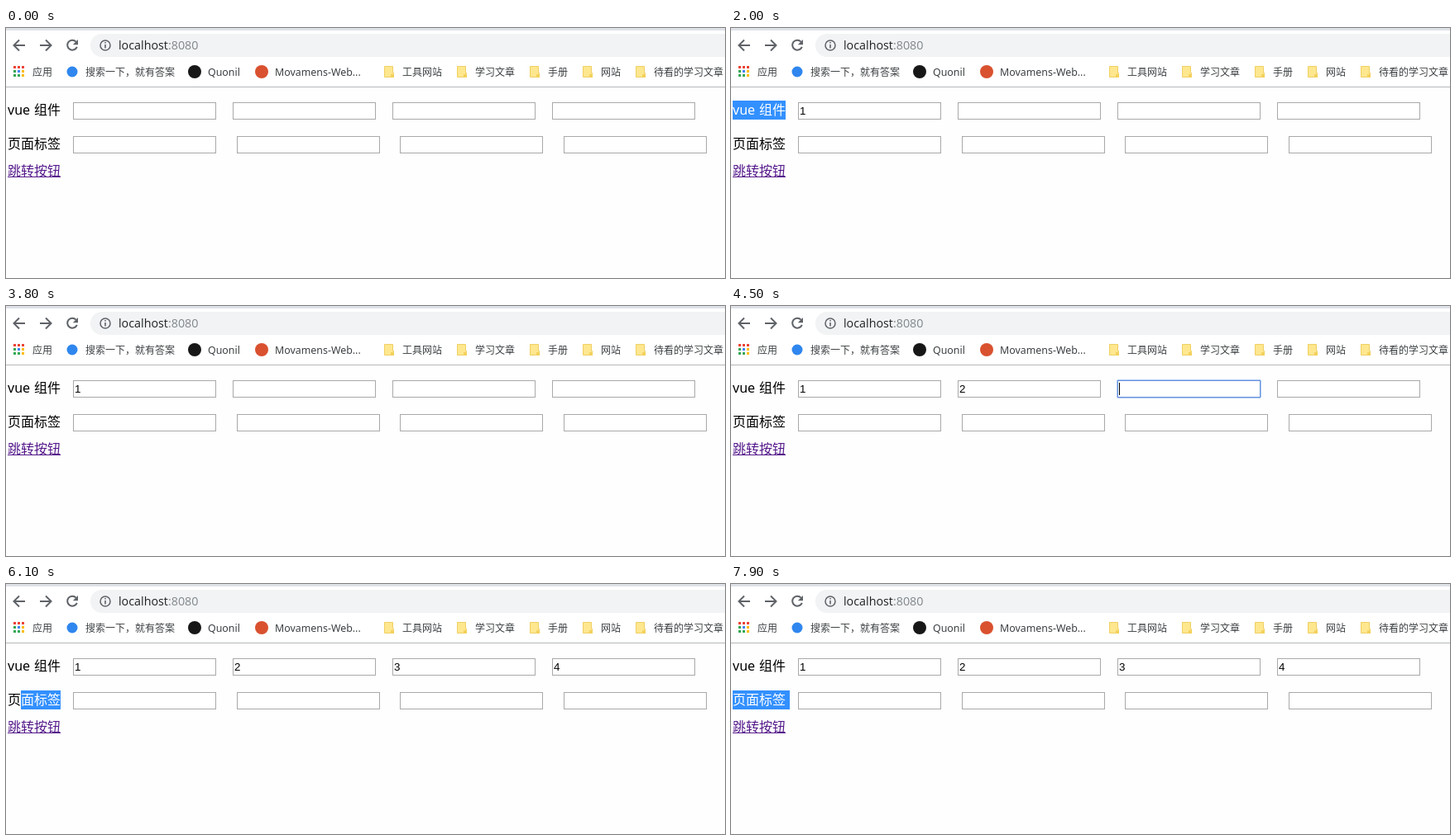
Recreate the animation shown at these times as an HTML page. Size 869x303 px, loop 8000 ms.

```html
<!DOCTYPE html>
<html lang="zh-CN">
<head>
<meta charset="utf-8">
<title>localhost:8080</title>
<style>
  html, body { margin: 0; width: 100%; height: 100%; overflow: hidden; background: #fefefe; }
  svg { display: block; }
  text { font-family: "Noto Sans", "Noto Sans CJK SC", "Noto Sans CJK", sans-serif; white-space: pre; }
  .bookmark { font-size: 12px; fill: #3c4043; }
  .latin { font-size: 12.4px; }
  .label { font-size: 16px; }
  .value { font: 13.333px "Liberation Sans", Arial, sans-serif; }
  .address { font: 14.3px "Open Sans", sans-serif; fill: #202124; }
  .icon { fill: none; stroke: #5f6368; stroke-width: 2; }
</style>
</head>
<body>
<svg id="stage" width="869" height="303" viewBox="0 0 869 303">
  <defs><clipPath id="picked"><rect id="clipBox"/></clipPath></defs>
  <rect width="869" height="71" fill="#fff"/>
  <rect width="869" height="3" fill="#dee1e6"/>
  <rect x="102" y="7" width="800" height="28" rx="14" fill="#f1f3f4"/>
  <rect y="71" width="869" height="1" fill="#b5b7ba"/>
  <g class="icon">
    <path d="M23 21H10M16 14.5L9.5 21L16 27.5"/>
    <path d="M41 21H54M48 14.5L54.5 21L48 27.5"/>
    <path d="M84.6 16.6A6 6 0 1 0 85.8 22.8"/>
    <circle cx="120" cy="21" r="6" stroke-width="1.5"/>
    <path d="M120 20V24.5M120 17V18.5" stroke-width="1.6"/>
  </g>
  <path d="M87 14V20.2H80.8Z" fill="#5f6368"/>
  <text class="address" x="136" y="26">localhost<tspan fill="#80868b">:8080</tspan></text>
  <g id="bookmarks"></g>
  <g id="page"></g>
  <g id="live"></g>
</svg>
<script>
const NS = "http://www.w3.org/2000/svg";
const BLUE = "#3390ff";
const LOOP = 8000;
const $ = id => document.getElementById(id);

function add(parent, tag, attrs, content) {
  const node = document.createElementNS(NS, tag);
  for (const key in attrs) node.setAttribute(key, attrs[key]);
  if (content) node.textContent = content;
  parent.appendChild(node);
  return node;
}
const show = (node, on) => node.setAttribute("visibility", on ? "visible" : "hidden");
function place(node, x, y, width, height) {
  Object.entries({ x, y, width, height }).forEach(([k, v]) => node.setAttribute(k, v));
}

// Bookmarks bar
const bar = $("bookmarks");
const [red, green, blue, yellow] = ["#ea4335", "#34a853", "#4285f4", "#fbbc04"];
[red, red, red, green, blue, yellow, green, green, yellow].forEach((fill, i) =>
  add(bar, "rect", { x: 9 + i % 3 * 5, y: 46 + Math.floor(i / 3) * 5, width: 3, height: 3, fill }));

[[80, 6.5, "#2f86ee"], [228, 8, "#181717"], [309, 8, "#d9512f"]].forEach(([cx, r, fill]) =>
  add(bar, "circle", { cx, cy: 53, r, fill }));

[[32, "应用"], [96, "搜索一下，就有答案"], [244, "Quonil", 1], [325, "Movamens-Web...", 1]].forEach(([x, name, latin]) =>
  add(bar, "text", { x, y: 58, class: latin ? "bookmark latin" : "bookmark" }, name));

[[457, "工具网站"], [545, "学习文章"], [633, "手册"], [697, "网站"], [761, "待看的学习文章"]].forEach(([x, name]) => {
  add(bar, "path", { d: `M${x + .5} 46.5h10v8h1v5h-11z`, fill: "#ffe78f", stroke: "#efcf63" });
  add(bar, "path", { d: `M${x + 8} 60v-4h4v4z`, fill: "#f3d15c" });
  add(bar, "text", { x: x + 22, y: 58, class: "bookmark" }, name);
});

// Page content
const page = $("page");
const fieldX = i => 81 + 193 * i;

function drawLabels(parent, fill) {
  [[2, 105, "vue"], [34, 105, "组件"], [2, 146, "页面标签"]].forEach(([x, y, label]) =>
    add(parent, "text", { x, y, fill, class: "label" }, label));
}
function drawField(x, y) {
  add(page, "rect", { x: x + .5, y: y + .5, width: 172, height: 20, fill: "#fff", stroke: "#a9a9a9" });
}
drawLabels(page, "#000");
for (let i = 0; i < 4; i++) {
  drawField(fieldX(i), 90);
  drawField(81 + Math.round(197.6 * i), 131);
}
add(page, "text", { x: 2, y: 179, fill: "#551a8b", class: "label" }, "跳转按钮");
add(page, "rect", { x: 2, y: 180, width: 64, height: 1, fill: "#551a8b" });

// Changing parts
const live = $("live");
const highlight = add(live, "rect", { fill: BLUE });
const pickedText = add(live, "g", { "clip-path": "url(#picked)" });
drawLabels(pickedText, "#fff");
const ring = add(live, "g", { fill: "none" });
const outerRing = add(ring, "rect", { stroke: "#a9c6f8", rx: 1.5 });
const innerRing = add(ring, "rect", { stroke: "#6792d8" });
const valueMark = add(live, "rect", { fill: BLUE });
const values = [0, 1, 2, 3].map(i =>
  add(live, "text", { x: fieldX(i) + 2, y: 105, class: "value" }, String(i + 1)));
const caret = add(live, "rect", { fill: "#000" });

// sel: [row, left, right] of the highlighted label
const steps = [
  { at: 0, filled: 0 },
  { at: 600, filled: 0, focus: 0 },
  { at: 900, filled: 1, focus: 0 },
  { at: 1900, filled: 1, sel: [0, 34, 66] },
  { at: 2000, filled: 1, sel: [0, 2, 66] },
  { at: 2500, filled: 1 },
  { at: 2700, filled: 1, sel: [0, 34, 66] },
  { at: 2800, filled: 1, sel: [0, 2, 66] },
  { at: 3300, filled: 1, focus: 0 },
  { at: 3500, filled: 1, focus: 0, marked: true },
  { at: 3800, filled: 1 },
  { at: 4100, filled: 1, focus: 1 },
  { at: 4200, filled: 2, focus: 1 },
  { at: 4500, filled: 2, focus: 2 },
  { at: 4700, filled: 3, focus: 2 },
  { at: 4900, filled: 3, focus: 3 },
  { at: 5100, filled: 4, focus: 3 },
  { at: 6000, filled: 4, sel: [1, 50, 66] },
  { at: 6100, filled: 4, sel: [1, 18, 66] },
  { at: 6500, filled: 4 },
  { at: 6800, filled: 4, sel: [1, 34, 71] },
  { at: 6900, filled: 4, sel: [1, 2, 71] },
  { at: 7500, filled: 4 },
  { at: 7800, filled: 4, sel: [1, 34, 71] },
  { at: 7900, filled: 4, sel: [1, 2, 71] }
];

function render(t) {
  const { at, filled, focus, sel, marked } = steps.filter(s => s.at <= t).pop();
  const focused = focus !== undefined;

  values.forEach((node, i) => {
    show(node, i < filled);
    node.setAttribute("fill", marked && i === focus ? "#fff" : "#000");
  });

  show(highlight, sel);
  show(pickedText, sel);
  if (sel) {
    const [row, left, right] = sel;
    [highlight, $("clipBox")].forEach(box => place(box, left, 88 + 41 * row, right - left, 23));
  }

  show(ring, focused);
  show(valueMark, marked);
  show(caret, focused && !marked && (t - at) % 1000 < 500);
  if (focused) {
    const x = fieldX(focus);
    place(outerRing, x - .5, 89.5, 174, 22);
    place(innerRing, x + .5, 90.5, 172, 20);
    place(valueMark, x + 2, 93, 8, 15);
    place(caret, x + (filled > focus ? 9 : 2), 93, 1, 15);
  }
}

const start = performance.now();
function tick() {
  render((performance.now() - start) % LOOP);
  requestAnimationFrame(tick);
}
tick();
</script>
</body>
</html>
```
